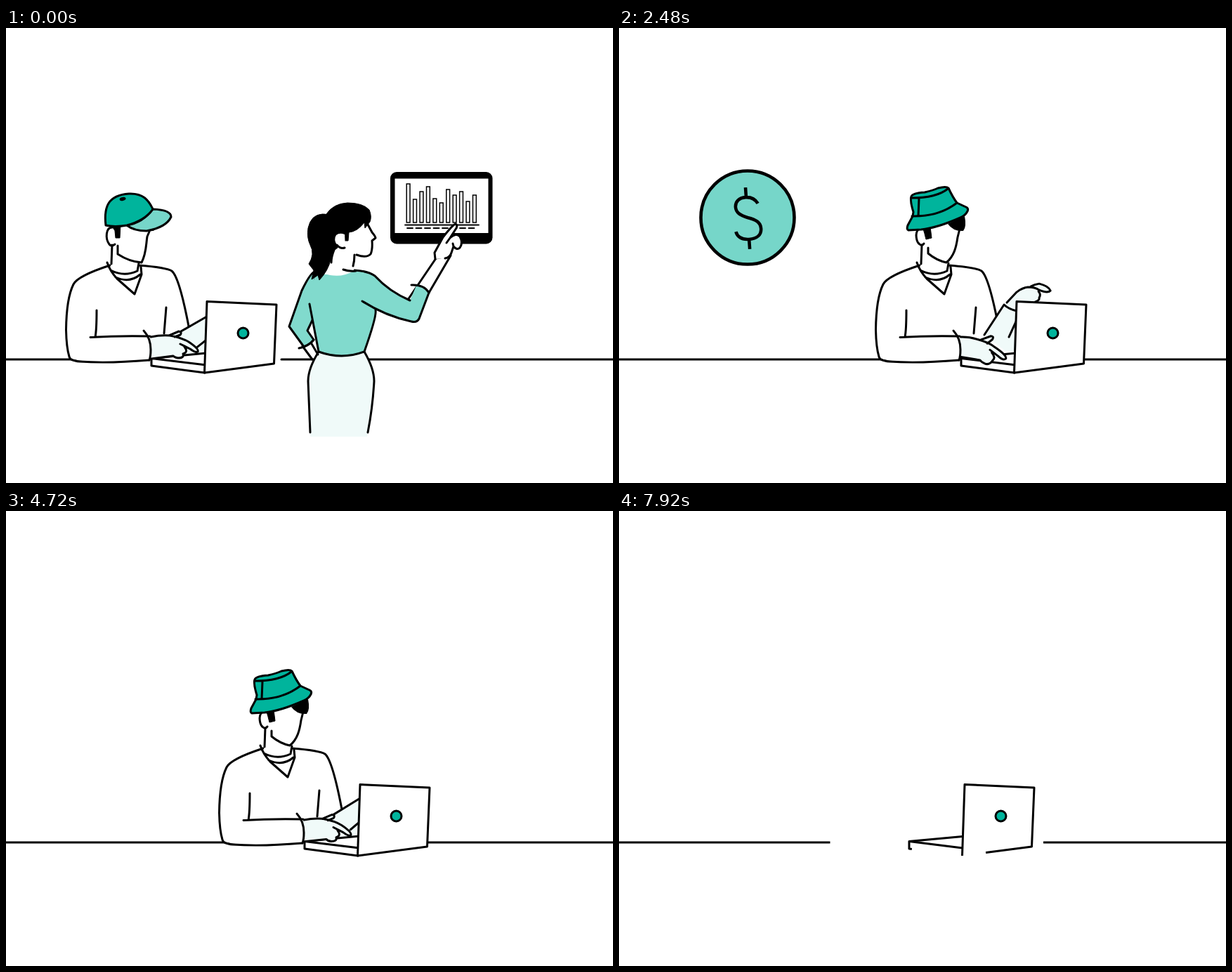
An HTML page for the animation above (8 s loop, 864 px wide and 648 px high).

```html
<!DOCTYPE html>
<html lang="en">
<head>
<meta charset="utf-8">
<title>Working day</title>
<style>
html,body{margin:0;width:100%;height:100%;overflow:hidden;background:#fff}
svg{display:block;width:100vw;height:100vh;fill:none;stroke:#000;stroke-width:3;stroke-linecap:round;stroke-linejoin:round}
.w{fill:#fff}.k{fill:#000}.pale{fill:#f0faf9}.mint{fill:#81dacd}.light{fill:#76d6c9}.green{fill:#00b49c}
.ns{stroke:none}
#draw{stroke-linecap:butt}
</style>
</head>
<body>
<svg viewBox="0 0 864 648">
  <g id="slide">
    <g id="raised" stroke-width="3.3">
      <g id="torso">
        <path d="M347 380Q318 388 308 400Q300 410 297 421M403 373Q435 373 444 377Q453 382 488 437M328 464L322 476L330 533M453 440L456 510M456 475Q485 497 513 484"/>
        <path d="M345 374Q350 387 365 400L397 424L406 386L405 374M352 386Q372 397 398 387M359 397Q382 407 403 390"/>
      </g>
      <g id="raisedHead">
        <path class="w" d="M351 354L352 375Q352 378 347 380M401 350L399 378L398 387"/>
        <path class="k" stroke-width="1" d="M340 334Q315 322 313 305Q313 298 319 296Q320 273 345 266Q361 263 378 268Q383 270 384 275Q392 279 392 284L388 289L383 287Q375 295 366 293Q356 289 349 293Q338 299 341 304Q349 312 347 322L361 333L357 338L348 331Z"/>
        <path d="M338 332C332 338 335 352 350 354Q361 358 361 349M387 288L396 301Q412 326 413 340Q413 347 402 349L381 355Q374 355 370 349"/>
      </g>
      <g id="leftArm">
        <path class="w ns" d="M260 380L260 478Q268 508 280 515Q295 521 298 516Q315 498 323 476L305 460L286 378Z"/>
        <path d="M260 380L260 478Q267 506 280 514Q294 521 298 516Q315 498 323 476M286 378Q293 413 300 435Q305 447 305 461M259 379Q264 383 275 382L288 377"/>
        <path d="M266 386L265 376Q254 357 242 341L244 298Q249 295 250 299Q251 291 257 296L258 302Q262 296 264 300L265 312Q273 306 272 317L262 331Q260 340 266 345M264 335Q285 352 284 365L284 377M251 326L250 306M258 302L258 312"/>
      </g>
      <g id="rightArm">
        <path class="w" d="M485 442L522 367Q535 377 563 374M557 377L532 437"/>
        <path d="M524 363Q521 345 525 320Q529 316 531 322L537 302Q541 298 543 304L544 313L548 298Q552 293 554 300L552 318L560 304Q567 301 567 310L561 326L569 316Q576 314 574 320L566 355Q562 362 562 371M531 322L530 338Q534 346 539 347M541 337Q549 336 554 345"/>
      </g>
    </g>

    <g id="cam">
      <path id="table"/>
      <g id="tablet">
        <rect class="k ns" x="547" y="205" width="145.500" height="102.500" rx="9"/>
        <rect class="w ns" x="553.500" y="214.500" width="133" height="77.500"/>
        <g id="bars" stroke-width="1.500" stroke-linejoin="miter"></g>
        <path stroke-width="1.800" d="M568 280.500H673"/>
        <path stroke-width="1.800" stroke-dasharray="8 4.500" d="M571 285H671"/>
      </g>
      <g id="woman">
        <path class="pale ns" d="M445 461Q430 485 430 503L433 582H514Q524 535 524 503Q524 485 510 461Z"/>
        <path d="M445 461Q430 485 430 503L433 576M510 461Q524 485 524 503Q522 540 515 576"/>
        <path class="w" d="M422 453L436 472M434 448L444 465"/>
        <path class="mint" d="M440 347Q434 347 421 374L403 425L424 454Q434 450 438 444L429 431L438 412Z"/>
        <path d="M417 456Q431 453 438 444"/>
        <path class="mint ns" d="M440 348Q470 356 496 345L520 351L545 390L526 403Q528 408 510 461Q478 473 445 461L432 393Z"/>
        <path d="M432 393L445 461Q478 473 510 461Q528 410 526 402"/>
        <path id="forearm" class="w"/>
        <path id="sleeve" class="mint ns"/>
        <path id="sleeveLine"/>
        <path id="cuff"/>
        <g id="pointer">
          <path class="w" d="M611 329L610 320L622 298Q636 280 640 279Q643 281 641 285L632 299Q641 291 646 297Q651 306 646 313Q642 317 637 311L634 320Q632 327 625 328M632 299L627 306M637 311L636 307"/>
        </g>
        <g id="womanHead">
          <path class="w ns" d="M466 315L452 349Q474 358 495 346L496 323L513 327L520 321L526 299L514 278L480 290Z"/>
          <path d="M467 316Q463 326 463 334M496 323Q496 332 494 339M480 344Q488 347 498 346"/>
          <path class="k" stroke-width="1" d="M456 265Q466 250 486 249Q508 249 517 259Q521 268 518 276L511 285L510 277Q500 290 488 291L487 303L482 303Q482 292 474 293Q467 296 470 305L472 313Q463 318 462 330Q459 345 446 359L444 352L435 358L438 345L431 336Q440 322 433 309Q428 299 430 285Q434 266 450 265Z"/>
          <path class="w ns" d="M482 294Q475 291 470 295Q466 301 471 309Q476 316 483 312Z"/>
          <path d="M471 309Q476 315 482 313M514 278L521 291Q526 297 526 299L521 303Q522 315 519 322Q513 328 499 323"/>
        </g>
      </g>
      <g id="man">
        <g id="typist">
          <path class="w ns" d="M148 338Q100 354 95 365Q80 430 90 470Q120 480 205 474L262 430Q250 350 236 345L188 338Z"/>
          <path d="M148 338Q102 353 96 365Q86 385 85.500 430Q86 455 90 468Q91 474 105 475Q145 478 204 473M189 338Q228 341 236 346Q247 355 261 430M129 402Q129 430 127 440M120 440.500Q160 438 205 439M228 398L225 435"/>
          <path class="w ns" d="M151 305L149 340Q168 356 187 346L189 330Z"/>
          <path id="faceFill" class="w ns"/>
          <path d="M144 334Q148 346 158 357L183 379L193 351L192 340M149 345Q168 355 187 346L189 335M156 355Q176 364 191 351M151 309L150 336"/>
          <path id="face"/>
          <path id="burn" class="k" stroke-width="1"/>
          <path class="k ns" d="M188 279Q196 290 210 289Q215 283 212 268Z"/>
          <g id="cap">
            <path class="light" d="M172 281Q195 277 209 258Q235 259 235 269Q228 284 200 289Q182 289 172 281Z"/>
            <path class="green" d="M142 281C139 255 145 238 175 236C195 235 203 245 209 258C202 268 190 276 172 281Q155 284 142 281Z"/>
            <ellipse class="k ns" cx="166" cy="243.500" rx="4.500" ry="2.500" transform="rotate(-12 166 243)"/>
          </g>
          <g id="farArm">
            <path class="pale ns" d="M240 437L268 394L286 376L302 369L318 374L319 385L311 390L297 398L285 460L270 460Z"/>
            <path class="pale" d="M272 391L286 376Q294 370 302 369Q312 369 318 373Q330 378 334 374Q331 367 318 364Q311 365 306 368"/>
            <path d="M240 437L268 394Q274 400 286 403M317 375Q321 379 318 384Q319 388 312 390M275 440L285 418"/>
          </g>
        </g>
        <path class="w" d="M285 463L207 470.500V481L283 491Z"/>
        <path d="M207 470.500L285 480"/>
        <g id="nearHand">
          <path id="handFill" class="pale ns"/>
          <path id="hand"/>
          <path d="M196 431Q206 442 206 458Q206 468 204 473"/>
        </g>
        <path class="w" d="M286 389.500L385 394L381.500 478L282.500 491Z"/>
        <circle class="green" cx="337.500" cy="434.500" r="7.500"/>
      </g>
    </g>
    <g id="hat">
      <path class="green" d="M138 268L139 262Q134 246 136 240Q138 235 155 234Q168 231 174 228Q186 225 189 228Q195 241 201 249L214 255Q218 257 216 261Q213 267 206 270Q172 285 150 287L132 288Q129 287 131 281Z"/>
      <path d="M137 268Q175 269 201 249M136 242Q172 242 188 229M147 243L146 268"/>
    </g>
  </g>

  <g id="coin" stroke-width="4.600" stroke-linecap="butt">
    <circle class="light" r="66.500"/>
    <path transform="rotate(-4)" d="M16-19C12-27 5-29-1-29C-10-29-16-24-16-16C-16-8-10-4 0 0C12 4 18 8 18 17C18 26 11 31 0 31C-9 31-16 28-18 19M0-43V-28M0 31V45"/>
  </g>
  <path id="streaks" stroke-width="4" stroke-linecap="butt"/>

  <g id="draw">
    <path data-t="6940 7500" d="M0 472H300.500"/>
    <path data-t="6940 7500" d="M864 472H604"/>
    <path data-t="7000 8010" d="M488.500 491L492 389.500L591 394L587.500 478L488.500 491"/>
    <path data-t="7720 8080" d="M489 463.500L413 470.500V481L488 491"/>
    <path data-t="7720 7900" d="M413 470.500L489 480"/>
    <circle id="dot" class="green" cx="543.500" cy="434.500"/>
  </g>
</svg>
<script>
const $ = id => document.getElementById(id);
const LOOP = 8000;
const clamp = x => Math.min(1, Math.max(0, x));
const span = (t, a, b) => clamp((t - a) / (b - a));
const smooth = x => x * x * (3 - 2 * x);
const inOut = x => x < .5 ? 4 * x ** 3 : 1 - 4 * (1 - x) ** 3;
const outCubic = x => 1 - (1 - x) ** 3;
const outBack = x => 1 + 3.7 * (x - 1) ** 3 + 2.7 * (x - 1) ** 2;
const mix = (a, b, k) => a + (b - a) * k;
const show = (id, on) => $(id).style.display = on ? '' : 'none';
const move = (id, value) => $(id).setAttribute('transform', value);
const shape = (id, value) => $(id).setAttribute('d', value);

// Blends two paths that share the same commands.
function blend([a, b], k) {
  const to = b.match(/-?[\d.]+/g);
  let i = 0;
  return a.replace(/-?[\d.]+/g, n => mix(+n, +to[i++], k).toFixed(2));
}

const poses = {
  faceFill: ['M152 284L147 308L155 325L189 338L195 332L204 290L195 270Z',
             'M146 287L148 308L155 325L189 338L188 333L205 286L195 270Z'],
  face: ['M151 284C142 284 141 300 147 308Q150 312 155 308M159 310L159 322Q176 333 193 334M193 334C200 320 199 310 201 297L204 290',
         'M146 287C141 292 143 305 148 308Q151 311 154 307M160 313L160 321Q172 331 186 334M186 334C197 325 200 312 202 298L205 286'],
  burn: ['M151 282L163 280L162 299L156 299L155 289Z', 'M153 285L163 283L165 299L157 301L155 293Z']
};
const arm = {
  forearm: ['M570 390L612 328L633 324L602 377', 'M562 402L600 352L620 346L595 398'],
  sleeve: ['M496 345Q515 346 525 353Q545 375 575 388L584 367Q595 366 602 377L588 414Q585 420 577 418Q540 410 507 389Z',
           'M496 346Q513 345 520 353Q533 370 568 403L578 385Q588 386 595 398L578 430Q574 437 565 433Q533 415 507 390Z'],
  sleeveLine: ['M496 345Q515 346 525 353Q545 375 575 388M602 377L588 414Q585 420 577 418Q540 410 507 389',
               'M496 346Q513 345 520 353Q533 370 568 403M595 398L578 430Q574 437 565 433Q533 415 507 390'],
  cuff: ['M577 366Q595 365 602 377', 'M571 383Q588 385 595 398']
};
const typing = {
  handFill: ['M204 440L232 438L247 432L250 436L243 440L255 444L272 456L273 461L257 460L250 469L238 467L205 471Z',
             'M204 440L228 443L250 440L253 444L245 452L255 457L270 470L268 474L254 473L244 480L233 474L205 468Z'],
  hand: ['M206 440Q220 437 233 438Q250 441 260 447Q275 457 273 461Q270 463 262 457L248 450M254 454Q260 462 252 464Q254 470 245 470Q241 470 238 467L207 471M232 438L246 432Q251 433 248 437L240 440',
         'M206 440Q218 440 228 444Q246 449 254 456Q273 469 270 473Q266 476 259 469L248 460M250 464Q256 471 252 475Q246 483 239 479Q236 478 233 474L207 468M236 445L250 440Q255 440 252 445L245 451']
};
const barsFrom = [222, 244, 233, 226, 243, 249, 230, 238, 233, 247, 238];
const barsTo = [222, 264, 258, 240, 252, 248, 242, 248, 256, 263, 239];
const streaks = [[229, 241, 241.5], [233, 314, 271], [169, 226, 291]];

$('bars').innerHTML = barsFrom.map((_, i) => `<rect x="${570.2 + i * 9.43}" width="4.800"/>`).join('');
const bars = [...$('bars').children];
const strokes = [...document.querySelectorAll('#draw path')];
for (const s of strokes) s.len = s.getTotalLength();

function hatTransform(t, dx, zoom) {
  if (t < 5600) {
    const drop = span(t, 1080, 1440), bounce = span(t, 1440, 1900);
    const y = -430 * (1 - drop ** 2) - 228 * bounce * (1 - bounce);
    const turn = -36 * (1 - drop) - 24 * bounce * (1 - bounce);
    return `translate(432 472) scale(${zoom}) translate(${dx - 432} ${y - 472}) rotate(${turn} 174 260)`;
  }
  const q = span(t, 5600, 6140);
  return `translate(${mix(386, -90, q)} ${225 - 260 * q * (1 - q) + 20 * q}) rotate(${-200 * q}) scale(${zoom}) translate(-174 -257)`;
}

function render(t) {
  const live = t < 6880, up = t >= 5600;
  show('slide', live);
  show('draw', !live);
  if (!live) {
    for (const s of strokes) {
      const [a, b] = s.dataset.t.split(' ').map(Number);
      const k = span(t, a, b);
      s.style.display = k ? '' : 'none';
      s.setAttribute('stroke-dasharray', `${k * s.len} 999`);
    }
    const pop = span(t, 7200, 7480);
    $('dot').setAttribute('r', 7.5 * outCubic(pop));
    show('dot', pop > 0);
  }

  const zoom = 1 + .155 * inOut(span(t, 4960, 5500));
  const dx = 280 * inOut(span(t, 900, 2330)) - 62 * inOut(span(t, 3600, 4390));
  move('slide', `translate(0 ${460 * span(t, 6200, 6800) ** 2.65})`);
  move('cam', `translate(432 472) scale(${zoom}) translate(-432 -472)`);
  move('man', `translate(${dx})`);
  shape('table', t < 1300 ? 'M0 472H200M392 472H864' : 'M-10 472H874');

  // presenter and chart
  const presenting = t < 2440;
  show('woman', presenting);
  show('tablet', presenting);
  const k = .5 - .5 * Math.cos(Math.PI * t / 1280);
  if (presenting) {
    move('woman', `translate(${475 * inOut(span(t, 1026, 2420))})`);
    move('tablet', `translate(${340 * inOut(span(t, 960, 2400))})`);
    move('womanHead', `translate(${-4.5 * k})`);
    move('pointer', `translate(${-12 * k} ${23 * k}) rotate(${-3 * k} 611 329)`);
    for (const id in arm) shape(id, blend(arm[id], k));
    bars.forEach((bar, i) => {
      const y = mix(barsFrom[i], barsTo[i], k);
      bar.setAttribute('y', y);
      bar.setAttribute('height', 277 - y);
    });
  }

  // man at the laptop
  show('typist', !up);
  show('nearHand', !up);
  const tilt = smooth(span(t, 80, 760));
  for (const id in poses) shape(id, blend(poses[id], tilt));
  move('cap', `translate(${-6.5 * tilt} ${-2.5 * tilt}) rotate(${-7 * tilt} 175 334)`);
  show('cap', t < 1440);
  const beat = t / 960 % 1;
  const lift = smooth(span(beat, .42, .64)) * (1 - smooth(span(beat, .72, .95)));
  move('farArm', `rotate(${32 * (1 - lift) - 5} 243 441)`);
  for (const id in typing) shape(id, blend(typing[id], lift));

  show('hat', t > 1080 && t < 6140);
  move('hat', hatTransform(t, dx, zoom));

  // hands thrown up
  show('raised', up);
  const rest = 1 - outCubic(span(t, 5600, 6080));
  move('raised', 'translate(0 -61)');
  move('torso', `translate(0 ${8 * rest})`);
  move('raisedHead', `translate(${-4 * rest} ${18 * rest}) rotate(${14 * rest} 375 370)`);
  move('leftArm', `rotate(${75 * rest} 294 500)`);
  move('rightArm', `rotate(${45 * rest} 490 470)`);

  // coin
  const pop = span(t, 1920, 2420);
  const away = 240 * Math.max(0, (t - 3560) / 360) ** 3;
  show('coin', pop > 0 && t < 4100);
  move('coin', `translate(${183 - away} 270) scale(${Math.max(0, outBack(pop))})`);
  const drift = (t - 3920) * .75;
  show('streaks', t > 3680 && t < 4400);
  shape('streaks', streaks.map(([a, b, y]) => {
    const l = Math.min(320, a - drift), r = Math.min(320, b - drift);
    return r - l > .5 ? `M${l} ${y}H${r}` : '';
  }).join(''));
}

function tick() {
  render(performance.now() % LOOP);
  requestAnimationFrame(tick);
}
tick();
</script>
</body>
</html>
```
